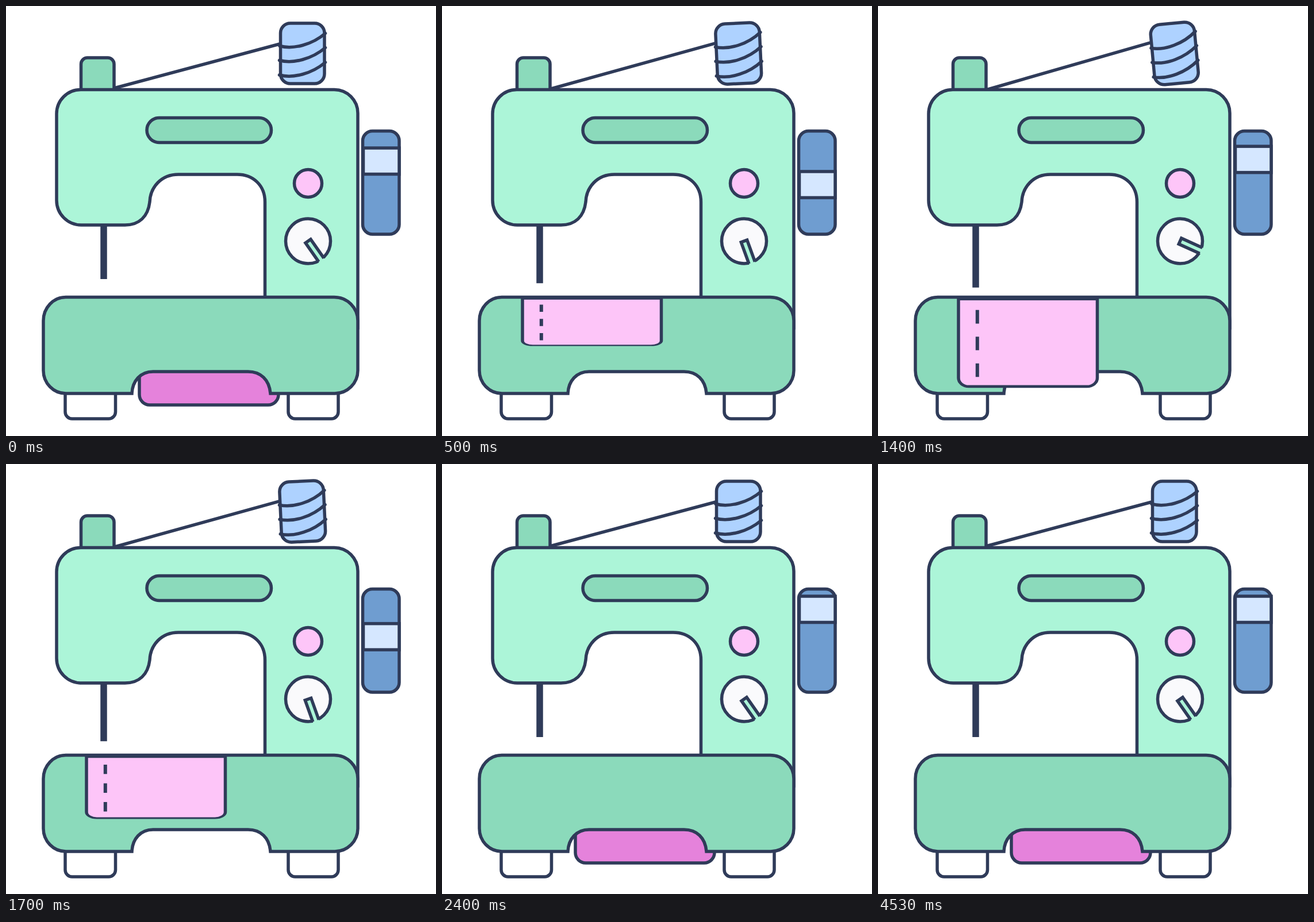
Write an HTML page that moves like this. It is 748 px wide and 748 px high and loops after 5010 ms.

```html
<!DOCTYPE html>
<html lang="en">
<head>
<meta charset="utf-8">
<title>Sewing machine</title>
<style>
  html, body { margin: 0; height: 100%; overflow: hidden; background: #fff; }
  svg { display: block; width: 100%; height: 100%; stroke: #2f3b59; stroke-width: 5.5; }
  .mint { fill: #acf5d8; }
  .green { fill: #8bdabb; }
  .pink { fill: #fdc5f8; }
  .magenta { fill: #e582db; }
  .sky { fill: #aed2ff; }
  .blue { fill: #6f9dd0; }
  .pale { fill: #d5e7ff; }
  .white { fill: #fff; }
  .line { fill: none; }
</style>
</head>
<body>
<svg viewBox="0 0 748 748">
  <path id="thread"/>
  <path id="needle" d="M170 330V475" stroke-width="11.500"/>
  <path class="green" d="M130.500 150V101a11 11 0 0 1 11-11H177a11 11 0 0 1 11 11V150"/>
  <path class="mint" d="M130 145.500H571a41 41 0 0 1 41 41V560H450.500V341C450.500 312 430 293 402 293H300C270 293 251 315 250 341C247 366 232 381 207 381H131a43 43 0 0 1-43-43V187.500a42 42 0 0 1 42-42z"/>
  <rect class="green" x="245" y="194.500" width="216.500" height="43" rx="21.500"/>
  <circle class="pink" cx="525.500" cy="308.500" r="24"/>

  <circle cx="525.500" cy="409" r="39" fill="#fafafc"/>
  <g id="slot">
    <path class="mint" d="M0-5.500H42.500V5.500H0z" stroke="none"/>
    <path class="line" d="M40-5.500H0V5.500H40"/>
  </g>

  <g id="spool">
    <rect class="sky" x="477.500" y="30" width="76.500" height="105" rx="17"/>
    <path class="line" stroke-linecap="round" d="M476 69.500c24 6.500 57-2.500 79.500-22M475.500 94.500c24 6.500 57-2.500 80-22M475.500 120c24 6.500 57-2.500 80-22"/>
  </g>

  <rect class="blue" x="620.500" y="217.500" width="63.500" height="179.500" rx="17"/>
  <rect id="band" class="pale" x="621.500" width="62.500" height="45.500"/>

  <path class="white" d="M103 670V706a12 12 0 0 0 12 12H178.500a12 12 0 0 0 12-12V670M491 670V706a12 12 0 0 0 12 12H566a12 12 0 0 0 12-12V670"/>
  <path id="backCloth" class="magenta" d="M232 0H474V167a18 18 0 0 1-18 18H250a18 18 0 0 1-18-18z"/>
  <path class="green" d="M104 506.500H571a41 41 0 0 1 41 41V634a40 40 0 0 1-40 40H460C458 650 443 636 421 636H256C234 636 220 652 219 674H104a39 40 0 0 1-39-40V547.500a39 41 0 0 1 39-41z"/>
  <g id="frontCloth">
    <path class="pink" d="M140 1H381.500V167a18 18 0 0 1-18 18H158a18 18 0 0 1-18-18z"/>
    <path class="line" d="M172.800 24V166" stroke-width="6" stroke-dasharray="28.500 27.700"/>
  </g>
</svg>
<script>
const LOOP = 5010, SEWING = 2400, HALF = SEWING / 2;
const part = id => document.getElementById(id);
const transform = (id, value) => part(id).setAttribute("transform", value);
const mix = (a, b, p) => a + (b - a) * p;

// Straight runs 0, 1, 0, 1 ... of 300 ms each.
const zigzag = time => 1 - Math.abs(time / 300 % 2 - 1);

// Half linear, half sine ease.
const softEase = p => mix(p, (1 - Math.cos(Math.PI * p)) / 2, 0.5);

// The dial's turn in degrees, one pose every 300 ms.
const dialPoses = [0, 15, 15, 15, 0, -46, 46, 23, 0, 0];
function dialTurn(time) {
  const i = Math.floor(time / 300);
  return mix(dialPoses[i], dialPoses[i + 1], time / 300 - i);
}

// The cloth unrolls in front, then winds back behind the base.
const clothShown = time => Math.min(1, time / 1137, (SEWING - time) / 1210);

// The band runs down the wheel twice, starting a little lower the first time.
const bandTop = time => mix(time < HALF ? 247 : 230, 351, softEase(time % HALF / HALF));

// The picture advances in alternating steps of 30 and 70 ms.
const stepped = time => Math.floor(time / 100) * 100 + (time % 100 >= 30 ? 30 : 0);

function draw(now) {
  const time = Math.min(stepped(now % LOOP), SEWING);
  const stitch = zigzag(time);
  const cloth = clothShown(time);
  transform("needle", `translate(0 ${22 * stitch})`);
  transform("spool", `rotate(${-8 * stitch} 516 82.500)`);
  part("thread").setAttribute("d", `M186 ${143.5 + 4.5 * stitch}L${480 - 3 * stitch} ${65 - 3.5 * stitch}`);
  transform("slot", `translate(525.500 409) rotate(${55 + dialTurn(time)})`);
  part("band").setAttribute("y", bandTop(time));
  transform("backCloth", `translate(0 509) scale(1 ${1 - cloth})`);
  transform("frontCloth", `translate(0 509) scale(1 ${cloth})`);
}

const start = performance.now();
function tick() {
  draw(performance.now() - start);
  requestAnimationFrame(tick);
}
tick();
</script>
</body>
</html>
```
